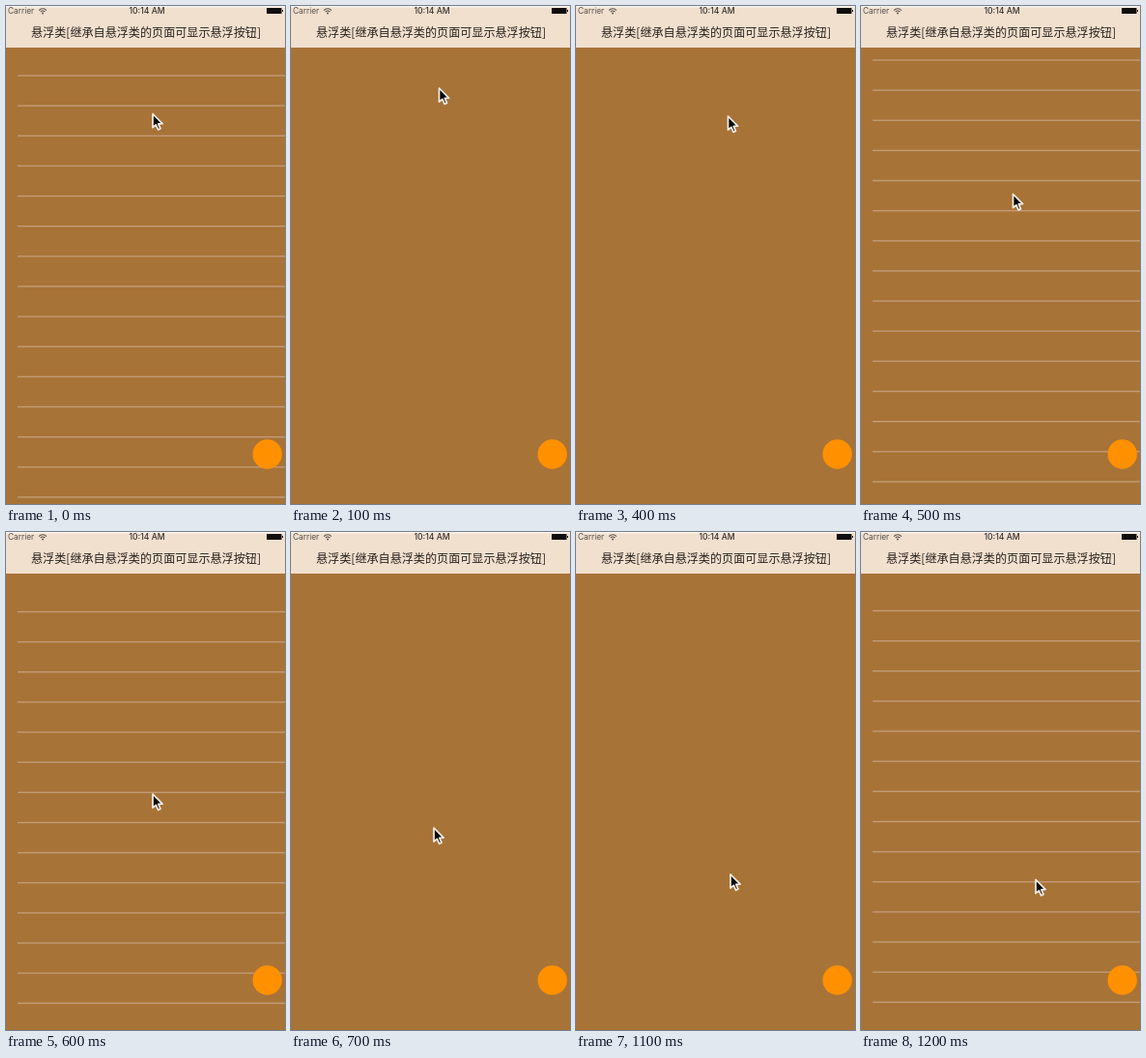
Write an HTML page with a canvas that moves like this. It is 289 by 515 pixels and loops after 1.3 s.

```html
<!DOCTYPE html>
<html lang="zh-CN">
<head>
<meta charset="utf-8">
<title>悬浮按钮</title>
<style>
html, body { margin: 0; width: 100%; height: 100%; overflow: hidden; background: #a87337; }
canvas { display: block; width: 289px; height: 515px; }
</style>
</head>
<body>
<canvas id="stage"></canvas>
<script>
const W = 289, H = 515, LOOP = 1300, ROW = 31.14;
const canvas = document.getElementById('stage');
const ctx = canvas.getContext('2d');
const dpr = window.devicePixelRatio || 1;
canvas.width = W * dpr;
canvas.height = H * dpr;

// Each pose holds until the next: start time, pointer tip, first row line, line count.
const poses = [
  { t: 0, x: 152, y: 111.5, top: 72, rows: 15 },
  { t: 100, x: 153.5, y: 85 },
  { t: 200, x: 155, y: 58 },
  { t: 300, x: 156, y: 42.5 },
  { t: 400, x: 157.5, y: 114 },
  { t: 500, x: 157.5, y: 194.5, top: 56, rows: 15 },
  { t: 600, x: 152, y: 271, top: 82.5, rows: 14 },
  { t: 700, x: 148, y: 306 },
  { t: 800, x: 144.5, y: 334.5 },
  { t: 1100, x: 160, y: 354 },
  { t: 1200, x: 181, y: 359.5, top: 81.5, rows: 14 }
];

function rect(x, y, w, h, color) {
  ctx.fillStyle = color;
  ctx.fillRect(x, y, w, h);
}

function disc(x, y, r, color) {
  ctx.fillStyle = color;
  ctx.beginPath();
  ctx.arc(x, y, r, 0, Math.PI * 2);
  ctx.fill();
}

function label(text, x, y, font, color, align) {
  ctx.font = font;
  ctx.fillStyle = color;
  ctx.textAlign = align;
  ctx.fillText(text, x, y);
}

function wifi(x, y) {
  ctx.strokeStyle = '#5d5650';
  ctx.lineWidth = 1.1;
  for (const r of [3, 5.2]) {
    ctx.beginPath();
    ctx.arc(x, y, r, -Math.PI * 0.77, -Math.PI * 0.23);
    ctx.stroke();
  }
  disc(x, y - 0.6, 1, '#5d5650');
}

function header() {
  rect(0, 0, W, 43, '#f2e0cf');
  rect(0, 0, W, 1.3, '#fbf7f2');
  label('Carrier', 2, 8.3, '8.3px Inter, sans-serif', '#55504b', 'left');
  wifi(38, 8);
  label('10:14 AM', 146, 8.3, '500 8.6px Inter, sans-serif', '#37322d', 'center');
  rect(270, 2, 15.5, 6, '#100d0b');
  rect(286, 4, 1, 2, '#100d0b');
  label('悬浮类[继承自悬浮类的页面可显示悬浮按钮]', 145, 32,
    '12.1px "Noto Sans CJK SC", "Noto Sans CJK", sans-serif', '#28221d', 'center');
}

function pointer(x, y) {
  const outline = [[0, 0], [0, 14.2], [3.3, 11.3], [5.6, 16.4], [8, 15.3], [5.8, 10.4], [10, 10.2]];
  ctx.beginPath();
  for (const [dx, dy] of outline) ctx.lineTo(x + dx, y + dy);
  ctx.closePath();
  ctx.lineJoin = 'round';
  ctx.lineWidth = 1.7;
  ctx.strokeStyle = '#f4eee8';
  ctx.fillStyle = '#080604';
  ctx.fill();
  ctx.stroke();
}

function draw(time) {
  const pose = poses.filter(p => p.t <= time).pop();
  ctx.setTransform(dpr, 0, 0, dpr, 0, 0);
  rect(0, 0, W, H, '#a87337');
  for (let i = 0; i < (pose.rows || 0); i++) {
    rect(12, pose.top + i * ROW - 0.7, W - 12, 1.4, '#c29b79');
  }
  header();
  disc(270.7, 463.5, 15.2, '#ff9000');
  pointer(pose.x, pose.y);
}

function tick() {
  draw(performance.now() % LOOP);
  requestAnimationFrame(tick);
}
tick();
</script>
</body>
</html>
```
